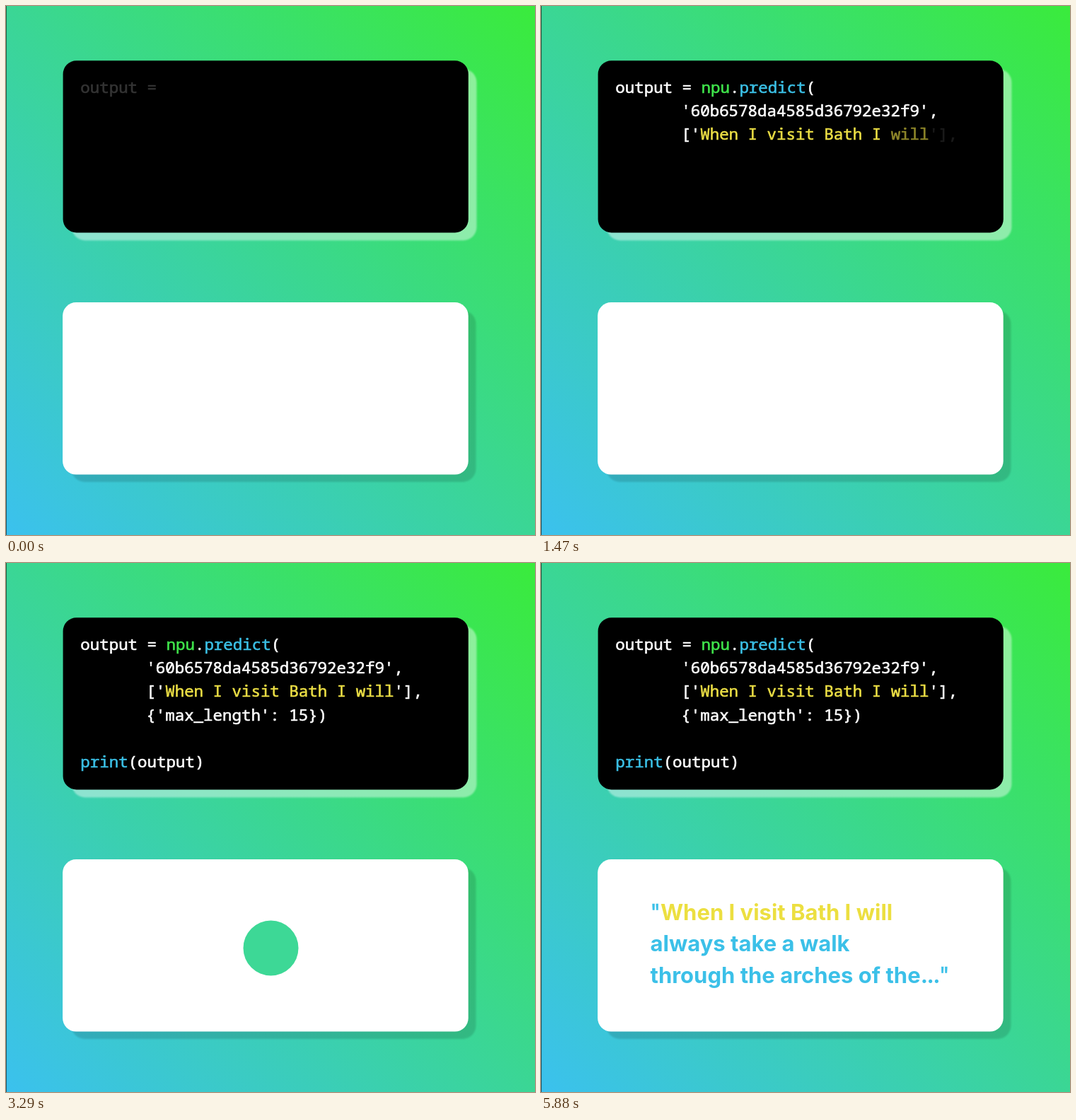
An HTML page for the animation above (6300 ms loop, 748 by 748 pixels).

```html
<!DOCTYPE html>
<html lang="en">
<head>
<meta charset="utf-8">
<title>Text prediction</title>
<style>
  html, body { margin: 0; width: 100%; height: 100%; overflow: hidden; }
  svg { display: block; width: 100vw; height: 100vh; }
  text { white-space: pre; }
  #code { font: 500 22.45px "Noto Sans Mono", "DejaVu Sans Mono", monospace; stroke-width: .6; }
  #answer { font: 700 31px Inter, "Open Sans", sans-serif; fill: #3bc0e8; }
  #answer .mark { font-weight: 400; stroke: #3bc0e8; stroke-width: .5; }
  #answer .dots { letter-spacing: -.05em; }
</style>
</head>
<body>
<svg viewBox="0 0 748 748">
  <defs>
    <linearGradient id="sky" x1="0" y1="1" x2="1" y2="0">
      <stop offset="0" stop-color="#3bc1ee"/>
      <stop offset="1" stop-color="#3aeb3c"/>
    </linearGradient>
    <filter id="soft"><feGaussianBlur stdDeviation="0.8"/></filter>
  </defs>
  <rect width="748" height="748" fill="url(#sky)"/>
  <rect width="1" height="748" fill="#000" opacity=".55"/>

  <rect x="93" y="89" width="572.5" height="242.5" rx="19" fill="#fff" opacity=".42" filter="url(#soft)"/>
  <rect x="80.6" y="77.2" width="573.2" height="243.2" rx="19"/>
  <rect x="92.5" y="430.5" width="572" height="242.5" rx="19" opacity=".13" filter="url(#soft)"/>
  <rect x="80.1" y="419.1" width="573.6" height="243.5" rx="19" fill="#fff"/>

  <g id="code"></g>
  <circle id="spinner" cx="374.5" cy="544.5" r="39"/>
  <g id="answer">
    <text x="154.5" y="505"><tspan class="mark">"</tspan><tspan fill="#ecdf40">When I visit Bath I will</tspan></text>
    <text x="154.5" y="549.4">always take a walk</text>
    <text x="154.5" y="593.8">through the arches of the<tspan class="dots">...</tspan><tspan class="mark">"</tspan></text>
  </g>
</svg>
<script>
const SVG = "http://www.w3.org/2000/svg";
const LOOP = 6300, TICK = 70;
const WHITE = "#fff", GREEN = "#40e64c", BLUE = "#3bc0e6", YELLOW = "#ecdf45";
const MARGIN = 105.3, INDENT = 198.3, ADVANCE = 13.47, LEADING = 33.2;

// Each token: left edge, row, column, then text and colour pairs. Tokens fade in one after another.
const tokens = [
  [MARGIN, 0, 0, "output =", WHITE],
  [MARGIN, 0, 9, "npu", GREEN, ".", WHITE],
  [MARGIN, 0, 13, "predict", BLUE, "(", WHITE],
  [INDENT, 1, 0, "'60b6578da4585d36792e32f9',", WHITE],
  [INDENT, 2, 0, "['", WHITE, "When", YELLOW],
  [INDENT, 2, 7, "I", YELLOW],
  [INDENT, 2, 9, "visit", YELLOW],
  [INDENT, 2, 15, "Bath", YELLOW],
  [INDENT, 2, 20, "I", YELLOW],
  [INDENT, 2, 22, "will", YELLOW],
  [INDENT, 2, 26, "'],", WHITE],
  [INDENT, 3, 0, "{'max_length':", WHITE],
  [INDENT, 3, 15, "15})", WHITE],
  [MARGIN, 5, 0, "print", BLUE, "(", WHITE],
  [MARGIN, 5, 6, "output)", WHITE]
];
const TOKEN_START = -60, TOKEN_STEP = 150, TOKEN_FADE = 300;

const byId = id => document.getElementById(id);
const code = byId("code"), spinner = byId("spinner"), answer = byId("answer");

function add(parent, name, attributes) {
  const node = parent.appendChild(document.createElementNS(SVG, name));
  for (const key in attributes) node.setAttribute(key, attributes[key]);
  return node;
}

const words = tokens.map(([left, row, column, ...parts]) => {
  const word = add(code, "text", { x: left + column * ADVANCE, y: 123 + row * LEADING });
  for (let i = 0; i < parts.length; i += 2) {
    const color = parts[i + 1];
    add(word, "tspan", { fill: color, stroke: color }).textContent = parts[i];
  }
  return word;
});

const ramp = (t, start, end) => Math.min(1, Math.max(0, (t - start) / (end - start)));
const mix = (a, b, k) => a + (b - a) * k;

function draw(t) {
  words.forEach((word, i) => {
    const start = TOKEN_START + i * TOKEN_STEP;
    word.setAttribute("opacity", ramp(t, start, start + TOKEN_FADE));
  });
  const tint = ramp(t, 2800, 3290);
  spinner.setAttribute("fill", `rgb(61 ${mix(220, 216, tint)} ${mix(132, 150, tint)})`);
  spinner.setAttribute("opacity", ramp(t, 2385, 2600) * (1 - ramp(t, 3430, 3570)));
  answer.setAttribute("opacity", ramp(t, 3500, 3780));
}

let origin;
function frame(now) {
  origin ??= now;
  const t = (now - origin) % LOOP;
  draw(Math.floor(t / TICK) * TICK);
  requestAnimationFrame(frame);
}
draw(0);
requestAnimationFrame(frame);
</script>
</body>
</html>
```
